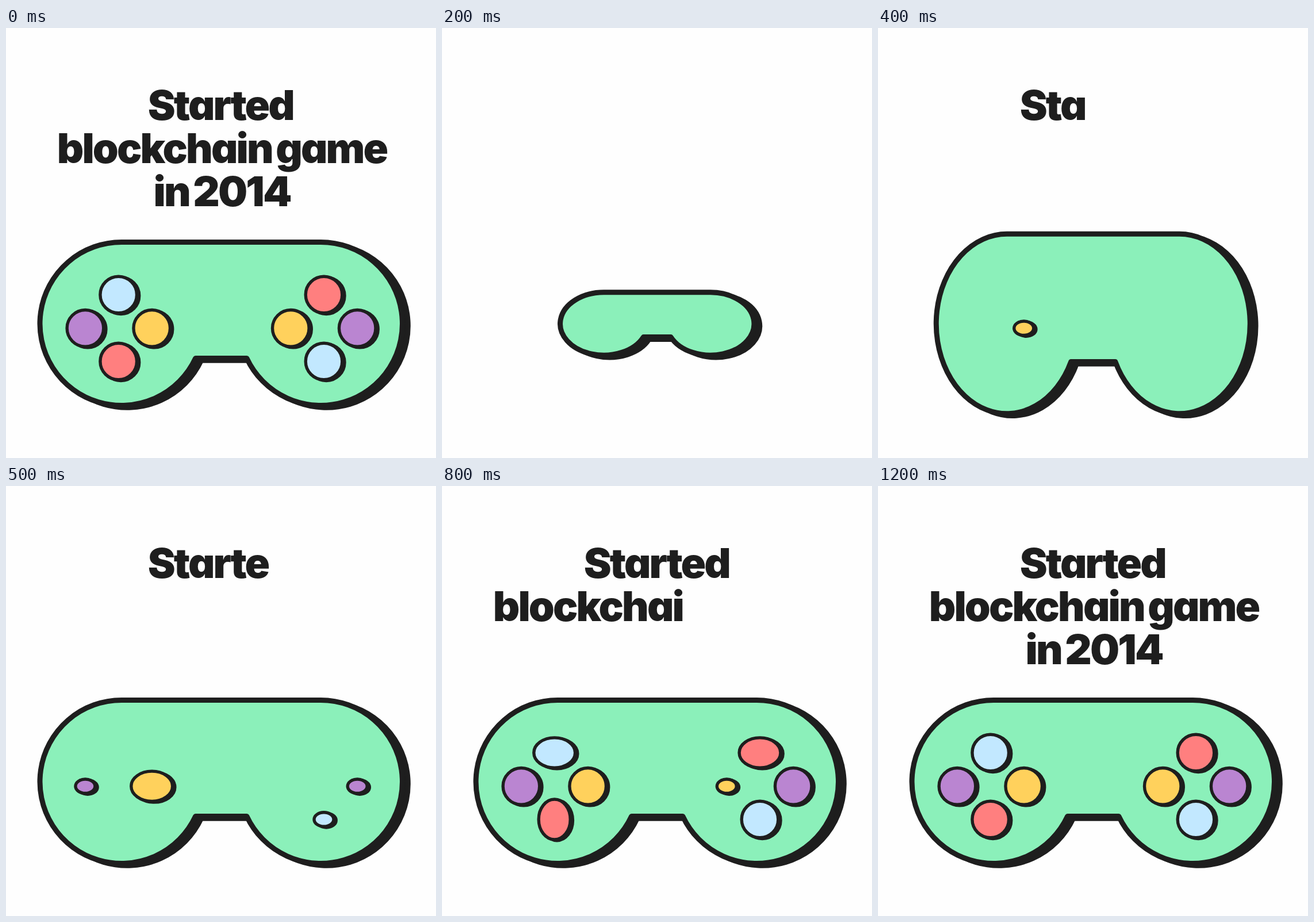
These frames come from a looping animation (748 px wide and 748 px high, 1600 ms). An HTML page:

```html
<!DOCTYPE html>
<html lang="en">
<head>
<meta charset="utf-8">
<title>Game controller</title>
<style>
  html, body { margin: 0; width: 100%; height: 100%; overflow: hidden; background: #fefefe; }
  svg { display: block; width: 100%; height: 100%; }
  text {
    font: 900 72px Inter, "Open Sans", sans-serif;
    font-feature-settings: "cv11";
    letter-spacing: -2.9px;
    word-spacing: -5px;
    text-anchor: middle;
    fill: #1e1e1e;
    white-space: pre;
  }
  path, ellipse { stroke: #1e1e1e; stroke-linejoin: round; }
</style>
</head>
<body>
<svg id="stage" viewBox="0 0 748 748"></svg>
<script>
const LOOP = 1600, STEP = 100, LAST_STEP = 12;
const INK = '#1e1e1e', GREEN = '#8bf0ba';
const BLUE = '#c2e8ff', PURPLE = '#ba85d1', YELLOW = '#ffd15c', RED = '#ff7f7f';

// Squash and stretch: [scale x, scale y] for each step after a shape appears
const POP = [[0.535, 0.385], [1.13, 0.822], [0.866, 1.1], [1, 1]];

const stage = document.getElementById('stage');

function add(tag, attrs, parent = stage) {
  const node = document.createElementNS('http://www.w3.org/2000/svg', tag);
  for (const name in attrs) node.setAttribute(name, attrs[name]);
  parent.append(node);
  return node;
}

// A shape with a solid shadow; line width and shadow keep their size while it pops
function makePopper(tag, fill, line, shadow, start, outline) {
  const group = add('g', { 'stroke-width': line });
  const layers = [
    add(tag, { fill: INK, transform: `translate(${shadow})` }, group),
    add(tag, { fill }, group)
  ];
  return step => {
    const age = step - start;
    group.setAttribute('visibility', age < 0 ? 'hidden' : 'visible');
    if (age < 0) return;
    const attrs = outline(...POP[Math.min(age, POP.length - 1)]);
    for (const layer of layers)
      for (const name in attrs) layer.setAttribute(name, attrs[name]);
  };
}

function bodyOutline(sx, sy) {
  const cx = 374.25, cy = 514.5, radius = 142, lobe = 173.25, notchY = 60;
  const notchX = lobe - Math.sqrt(radius ** 2 - notchY ** 2);
  const at = (x, y) => `${cx + x * sx} ${cy + y * sy}`;
  const arc = `A${radius * sx} ${radius * sy} 0 1 1 `;
  return {
    d: `M${at(-lobe, -radius)}L${at(lobe, -radius)}${arc}${at(notchX, notchY)}` +
       `L${at(-notchX, notchY)}${arc}${at(-lobe, -radius)}Z`
  };
}

function makeButton([cx, cy, fill, start]) {
  return makePopper('ellipse', fill, 5.4, '4.2 1.7', start,
    (sx, sy) => ({ cx, cy, rx: 31.8 * sx, ry: 31.8 * sy }));
}

function makeLine([words, x, y]) {
  const text = add('text', { x, y });
  const shown = add('tspan', {}, text);
  const rest = add('tspan', { fill: 'none' }, text);
  return count => {
    shown.textContent = words.slice(0, Math.max(0, count));
    rest.textContent = words.slice(Math.max(0, count));
    return count - words.length;
  };
}

const lines = [
  ['Started', 373.3, 160],
  ['blockchain game', 375.6, 235],
  ['in 2014', 375.6, 310]
].map(makeLine);

const poppers = [
  makePopper('path', GREEN, 9, '9.8 3.8', 2, bodyOutline),
  ...[
    [195.7, 464, BLUE, 7], [137.9, 522.3, PURPLE, 5],
    [253.7, 522.3, YELLOW, 4], [195.7, 580, RED, 6],
    [553, 464, RED, 7], [495.3, 522.3, YELLOW, 8],
    [611.2, 522.3, PURPLE, 5], [553, 580, BLUE, 5]
  ].map(makeButton)
];

function draw(time) {
  // The loop opens on the finished picture
  const step = Math.floor(time % LOOP / STEP) || LAST_STEP;
  for (const pop of poppers) pop(step);
  const typed = step < 4 ? 0 : Math.round(3 + 3.25 * (step - 4));
  lines.reduce((left, type) => type(left), typed);
}

const begin = performance.now();
function tick() {
  draw(performance.now() - begin);
  requestAnimationFrame(tick);
}
tick();
</script>
</body>
</html>
```
